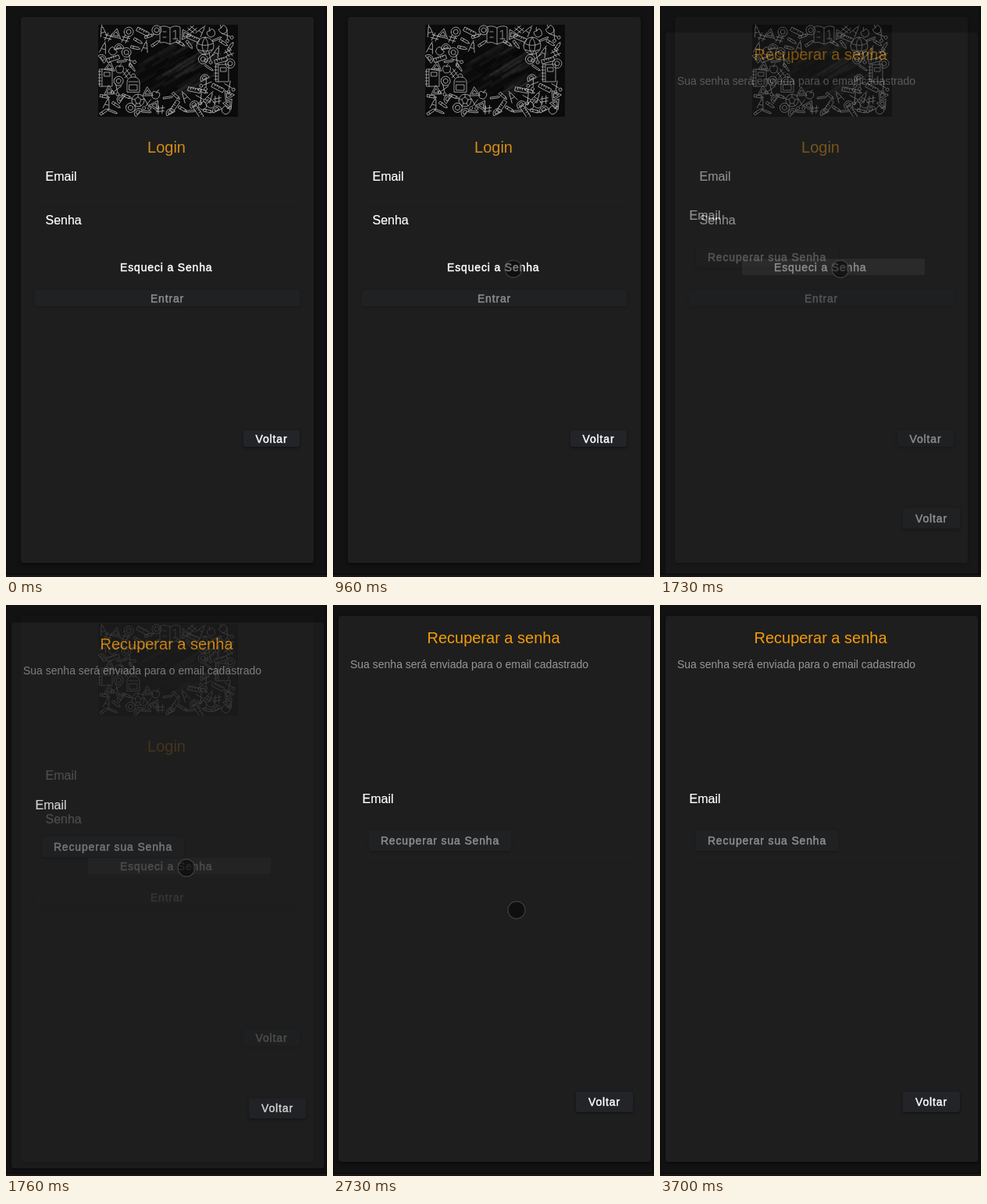
Animation of 411 by 732 pixels, one loop 4560 ms. Source, as an HTML page with a canvas:

```html
<!DOCTYPE html>
<html lang="pt">
<head>
<meta charset="utf-8">
<title>Login</title>
<style>
  html, body { margin: 0; width: 100%; height: 100%; overflow: hidden; background: #121212; }
  body { position: relative; font: 14px/20px Arial, "Liberation Sans", sans-serif; color: #fff; }
  body * { position: absolute; box-sizing: border-box; margin: 0; }
  p { white-space: pre; }
  #app { left: 0; top: 0; width: 411px; height: 728px; overflow: hidden; }
  .page { inset: 0; background: #121212; }
  #next { box-shadow: 0 -40px #121212; }
  .card {
    top: 14px; height: 700px; border-radius: 4px; background: #1e1e1e;
    box-shadow: 0 3px 1px -2px rgba(0,0,0,.2), 0 2px 2px rgba(0,0,0,.14), 0 1px 5px rgba(0,0,0,.3);
  }
  .title { left: 0; width: 411px; text-align: center; font-size: 20px; }
  .label { font-size: 16px; -webkit-text-stroke: .2px; }
  .cap, .btn { letter-spacing: .84px; -webkit-text-stroke: .45px; }
  .rule { height: 1px; background: #202022; }
  .btn {
    height: 26px; line-height: 26px; text-align: center; border-radius: 3px; background: #222428;
    box-shadow: 0 2px 2px rgba(0,0,0,.2), 0 1px 4px rgba(0,0,0,.2);
  }
  .slim { height: 21px; line-height: 22px; }
  .off { opacity: .5; }
  #ripple { left: 105px; top: 324px; width: 234px; height: 21px; border-radius: 2px; background: rgba(255,255,255,.11); }
  #touch {
    left: -11.5px; top: -11.5px; width: 23px; height: 23px; border-radius: 50%;
    background: rgba(0,0,0,.5); border: 1.5px solid rgba(110,110,110,.55);
  }
  #edgeL { left: 0; top: 0; width: 1px; height: 729px; background: #090909; }
  #edgeR { left: 408px; top: 0; width: 3px; height: 729px; background: #0e0e0e; }
  #edgeB { left: 0; top: 728px; width: 411px; height: 4px; background: #1b1517; border-top: 1px solid #080808; }
</style>
</head>
<body>
<div id="app">
  <div class="page">
    <div class="card" style="left:19px;width:375px"></div>
    <canvas id="board" width="179" height="118" style="left:118px;top:24px"></canvas>
    <p class="title" style="top:171px;color:#d48d19">Login</p>
    <p class="label" style="left:50.5px;top:209px">Email</p>
    <div class="rule" style="left:37px;top:249px;width:339px"></div>
    <p class="label" style="left:50.5px;top:265px">Senha</p>
    <div class="rule" style="left:37px;top:305px;width:339px"></div>
    <p class="cap" style="left:146px;top:325px">Esqueci a Senha</p>
    <div id="ripple"></div>
    <p class="btn slim off" style="left:37px;top:364px;width:339px">Entrar</p>
    <p class="btn slim" style="left:304px;top:544px;width:72px">Voltar</p>
  </div>
  <div class="page" id="next">
    <div class="card" style="left:7px;width:400px"></div>
    <p class="title" style="top:32px;color:#f39c08">Recuperar a senha</p>
    <p style="left:22px;top:66px;color:#979797">Sua senha será enviada para o email cadastrado</p>
    <p class="label" style="left:37.5px;top:239px">Email</p>
    <div class="rule" style="left:22px;top:276px;width:370px"></div>
    <p class="btn off" style="left:46px;top:289px;width:182px">Recuperar sua Senha</p>
    <div class="rule" style="left:40px;top:322px;width:352px"></div>
    <p class="btn" style="left:311px;top:624px;width:73px">Voltar</p>
  </div>
</div>
<div id="edgeL"></div><div id="edgeR"></div><div id="edgeB"></div>
<div id="touch"></div>

<script>
const $ = id => document.getElementById(id);
const clamp = v => Math.min(1, Math.max(0, v));

const big = {
  book: 'M0-9Q-7-13-13-10V10Q-7 8 0 12Q7 8 13 10V-10Q7-13 0-9V12M-9-4H-5M-9 3H-5M4-4L7-6V5M4 5H10',
  globe: 'M-11 0A11 11 0 1 1 11 0A11 11 0 1 1-11 0M-10-3Q0 2 10-3M-9 5Q0 9 9 5M0-11Q-8 0 0 11M0-11Q8 0 0 11',
  notes: 'M-8-11H8V11H-8ZM-5-11V11M-10-8H-6M-10-4H-6M-10 0H-6M-10 4H-6M-10 8H-6M-2-7H5V-2H-2Z',
  bag: 'M-8 10V-3Q-7-9 0-9Q7-9 8-3V10ZM-3-9Q-3-13 0-13Q3-13 3-9M-5 1H5V8H-5ZM-6-3H6',
  ball: 'M-8 0A8 8 0 1 1 8 0A8 8 0 1 1-8 0M0-4L4-1L2 4H-2L-4-1ZM0-4V-8M4-1L8-2M2 4L4 7M-2 4L-4 7M-4-1L-8-2'
};
const small = [
  'M-6-1.5H3L6 0L3 1.5H-6ZM-3-1.5V1.5M3-1.5V1.5',
  'M-8-2.5H8V2.5H-8ZM-5-2.5V0M-2-2.5V-1M1-2.5V0M4-2.5V-1',
  'M-6 5L0-6L7 5ZM-3 3L0-2L4 3Z',
  'M-6-1.5H3L6 0L3 1.5H-6ZM-3-1.5V1.5',
  'M0-8V-5M-4 7L-1-5H1L4 7M-2 2H2',
  'M-4-6L2 3M4-6L-2 3M-2 5A2 2 0 1 1-5 4A2 2 0 0 1-2 5M5 5A2 2 0 1 1 2 4A2 2 0 0 1 5 5',
  'M-6-1H4L6 0L4 1H-6Z',
  'M0-3Q-5-6-5 0Q-4 6 0 5Q4 6 5 0Q5-6 0-3Q0-6 2-7',
  'M-6 3A6 6 0 0 1 6 3ZM-3 2A3 3 0 0 1 3 2Z',
  'M-6 0A6 6 0 1 1 6 0A6 6 0 1 1-6 0M-3 0A3 3 0 1 1 3 0A3 3 0 1 1-3 0',
  'M-2-5L-4 5M3-5L1 5M-5-2H5M-6 2H4'
];

// Chalkboard: a few large doodles, then small ones scattered around the bare centre
function drawBoard() {
  const c = $('board').getContext('2d');
  let seed = 7;
  const rnd = () => (seed = seed * 16807 % 2147483647) / 2147483647;

  c.fillStyle = '#0b0b0b';
  c.fillRect(0, 0, 179, 118);
  for (let i = 0; i < 70; i++) {
    const x = 35 + rnd() * 85, y = 35 + rnd() * 60, len = 15 + rnd() * 35;
    c.strokeStyle = i % 3 ? 'rgba(140,140,140,.07)' : 'rgba(0,0,0,.2)';
    c.lineWidth = 1 + rnd() * 4;
    c.beginPath(); c.moveTo(x, y); c.lineTo(x + len, y - len * .6); c.stroke();
  }

  c.strokeStyle = '#b4b4b4';
  c.lineJoin = c.lineCap = 'round';
  const placed = [];
  const put = (d, x, y, r, angle = 0) => {
    placed.push({ x, y, r });
    c.save();
    c.translate(x, y); c.rotate(angle);
    c.lineWidth = .8;
    c.stroke(new Path2D(d));
    c.restore();
  };

  put(big.book, 92, 13, 13);
  put(big.globe, 137, 27, 11);
  put(big.notes, 10, 68, 11);
  put(big.notes, 159, 62, 11);
  put(big.bag, 45, 76, 11);
  put(big.ball, 51, 97, 8);

  for (let i = 0, n = 0; i < 3000; i++) {
    const x = 6 + rnd() * 167, y = 6 + rnd() * 106, r = 4.6;
    const bare = Math.hypot((x - 90) / 46, (y - 57) / 35) < 1;
    if (bare || placed.some(p => Math.hypot(p.x - x, p.y - y) < p.r + r)) continue;
    put(small[n++ % small.length], x, y, r, (rnd() - .5) * 2);
  }
}

const bezier = (a, b, s) => 3 * (1 - s) ** 2 * s * a + 3 * (1 - s) * s * s * b + s ** 3;
function ease(x) {
  let lo = 0, hi = 1;
  for (let i = 0; i < 24; i++) {
    const mid = (lo + hi) / 2;
    if (bezier(.36, .04, mid) < x) lo = mid; else hi = mid;
  }
  return bezier(.66, 1, lo);
}

const LOOP = 4560;
const hold = (t, from, step) => from + Math.floor((t - from) / step) * step;

// Pointer: start of each move, then key points as time, x, y
const moves = [200, 760, 2450, 3060];
const track = [
  [200, 340, 667], [450, 265, 440], [690, 230.5, 353.5], [900, 230.5, 336.5], [2400, 230.5, 336.5],
  [2730, 234.5, 390.5], [2940, 263, 501], [3130, 317.5, 630.5], [3480, 373, 710], [3700, 374, 745]
];
function touchAt(t) {
  const i = track.findIndex(k => k[0] > t);
  if (i < 1) return null;
  const now = hold(t, moves.filter(m => m <= t).pop(), 70);
  const [t0, x0, y0] = track[i - 1], [t1, x1, y1] = track[i];
  const p = clamp((now - t0) / (t1 - t0));
  return [x0 + (x1 - x0) * p, y0 + (y1 - y0) * p];
}

function render(t) {
  const pos = touchAt(t);
  $('touch').style.visibility = pos ? 'visible' : 'hidden';
  if (pos) $('touch').style.transform = `translate(${pos[0]}px, ${pos[1]}px)`;

  const now = hold(t, 20, 30);
  const press = clamp((now - 1520) / 200);
  $('ripple').style.opacity = clamp(press * 3);
  $('ripple').style.clipPath = `circle(${press * 135}px at 125px 12px)`;

  const p = ease(clamp((now - 1676) / 280));
  $('next').style.opacity = p;
  $('next').style.transform = `translateY(${40 * (1 - p)}px)`;
}

drawBoard();
const start = performance.now();
function loop() {
  render((performance.now() - start) % LOOP);
  requestAnimationFrame(loop);
}
loop();
</script>
</body>
</html>
```
